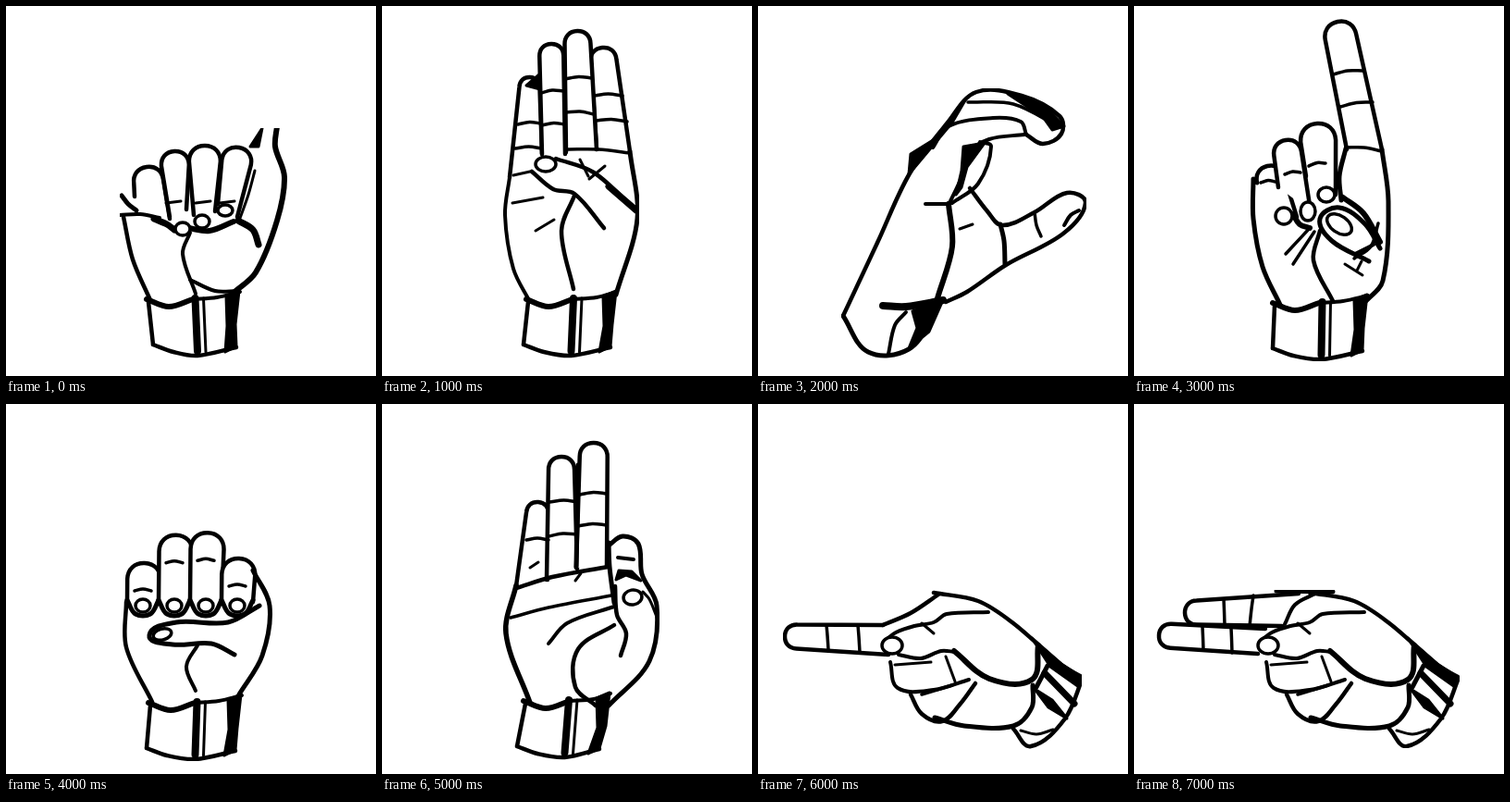
These frames come from a looping animation (400x400 px, 8 s). An HTML page:

```html
<!DOCTYPE html>
<html lang="en">
<head>
<meta charset="utf-8">
<title>Hand alphabet</title>
<style>
html, body { margin: 0; width: 100%; height: 100%; overflow: hidden; background: #fff; }
svg { display: block; width: 100vw; height: 100vh; }
path, ellipse { fill: none; stroke: #000; stroke-linecap: round; stroke-linejoin: round; }
.skin { fill: #fff; }
.dark { fill: #000; }
</style>
</head>
<body>
<svg id="stage" viewBox="0 0 400 400"></svg>
<script>
const HOLD = 1000;
let ink = '';

const draw = (d, w, kind = '') => { ink += `<path d="${d}" stroke-width="${w}" class="${kind}"/>`; };

// Smooth curve through x, y pairs; handles follow the neighbouring points
function curve(xy) {
  const p = [];
  for (let i = 0; i < xy.length; i += 2) p.push([xy[i], xy[i + 1]]);
  const slope = i => {
    const a = p[Math.max(0, i - 1)], b = p[Math.min(p.length - 1, i + 1)];
    const len = Math.hypot(b[0] - a[0], b[1] - a[1]) || 1;
    return [(b[0] - a[0]) / len, (b[1] - a[1]) / len];
  };
  let d = 'M' + p[0];
  for (let i = 1; i < p.length; i++) {
    const a = p[i - 1], b = p[i], s = slope(i - 1), e = slope(i);
    const h = Math.hypot(b[0] - a[0], b[1] - a[1]) / 3;
    d += `C${a[0] + s[0] * h},${a[1] + s[1] * h} ${b[0] - e[0] * h},${b[1] - e[1] * h} ${b}`;
  }
  return d;
}
const line = (w, ...xy) => draw(curve(xy), w);
const dark = (...xy) => draw('M' + xy + 'Z', 3, 'dark');
const crease = (x1, y1, x2, y2) => line(3.5, x1, y1, (x1 + x2) / 2, (y1 + y2) / 2 - 2, x2, y2);

// Finger from one foot over a round tip of radius r to the other foot
function finger(x1, y1, tx, ty, x2, y2, r) {
  const dx = tx - (x1 + x2) / 2, dy = ty - (y1 + y2) / 2, len = Math.hypot(dx, dy);
  const ux = dx / len, uy = dy / len;
  const at = (along, side) => [tx + (ux * along - uy * side) * r, ty + (uy * along + ux * side) * r];
  draw(`M${x1},${y1}L${at(-1, -1)}C${at(-.4, -1)} ${at(0, -.6)} ${at(0, 0)}` +
    `C${at(0, .6)} ${at(-.4, 1)} ${at(-1, 1)}L${x2},${y2}`, 4.5, 'skin');
}

function nail(x, y, rx, ry, turn = 0) {
  ink += `<ellipse cx="${x}" cy="${y}" rx="${rx}" ry="${ry}" transform="rotate(${turn} ${x} ${y})" stroke-width="3.5" class="skin"/>`;
}

// Upright wrist: left edge a to b, right edge c to d, top at y
function wrist(a, b, y, c, d) {
  const m = (a + c) / 2 + 2, n = m + (b - a) / 2;
  line(6, a - 2, y - 3, a + 22, y + 5, a + 48, y - 3);
  line(4, a + 48, y - 3, a + 74, y - 5, c + 2, y - 11);
  line(4.5, a, y, b, y + 46);
  line(4.5, b, y + 46, b + 22, y + 54, n, y + 58, d, y + 49);
  line(8, m, y - 4, n, y + 53);
  line(3, m + 9, y - 4, n + 9, y + 54);
  dark(c - 13, y - 6, c + 1, y - 12, c - 3, y + 24, d, y + 48, d - 12, y + 54, c - 12, y + 26);
}

function fist() {
  finger(139, 206, 152, 174, 177, 230, 16);
  finger(177, 228, 182, 157, 195, 220, 15);
  finger(229, 214, 252, 153, 250, 228, 16);
  finger(203, 226, 215, 151, 226, 222, 17);
  for (const x of [181, 213, 239]) line(3, x - 8, 213, x + 8, 211);
  line(6, 293, 130, 291, 152, 301, 185, 293, 232, 270, 288, 246, 310);
  dark(277, 132, 273, 152, 264, 152);
  line(3, 269, 178, 262, 204, 252, 232);
  line(7, 251, 232, 267, 242, 273, 258);
  line(7, 160, 230, 174, 236, 182, 242);
  line(6, 197, 240, 220, 243, 246, 233);
  nail(191, 241, 8, 7);
  nail(212, 233, 8, 7);
  nail(237, 221, 8, 6);
  line(5, 125, 205, 132, 214, 141, 221);
  line(4, 123, 226, 145, 225, 166, 229);
  line(4.5, 127, 228, 137, 274, 156, 318);
  line(4, 199, 245, 191, 268, 205, 311);
  line(4, 199, 296, 226, 308, 250, 308);
  wrist(154, 159, 320, 251, 249);
}

function flat() {
  finger(138, 185, 160, 77, 173, 160, 11);
  dark(170, 74, 156, 86, 171, 90);
  finger(173, 160, 183, 41, 198, 160, 13);
  finger(232, 155, 238, 45, 268, 157, 14);
  finger(199, 158, 211, 27, 232, 155, 14);
  crease(198, 79, 227, 78);
  crease(199, 115, 229, 117);
  crease(172, 94, 196, 92);
  crease(173, 129, 198, 128);
  crease(229, 97, 260, 97);
  crease(231, 124, 265, 125);
  crease(147, 128, 172, 127);
  crease(144, 154, 173, 154);
  crease(200, 155, 268, 159);
  line(3, 142, 183, 160, 179);
  nail(177, 171, 11, 8);
  line(4.5, 188, 165, 229, 180, 275, 222);
  line(7, 245, 195, 275, 221);
  line(4.5, 162, 179, 185, 198, 208, 203, 240, 240);
  line(3, 214, 166, 223, 184);
  line(3, 241, 173, 224, 187);
  line(3, 141, 213, 174, 207);
  line(3, 166, 243, 186, 231);
  line(4.5, 208, 205, 194, 243, 207, 306);
  line(4, 138, 185, 133, 226, 142, 284, 160, 320);
  line(5, 268, 157, 276, 230, 253, 312);
  wrist(158, 153, 320, 252, 247);
}

function cup() {
  line(4.5, 92, 335, 129, 256, 164, 181, 205, 126, 236, 93, 285, 97, 326, 119, 328, 138, 308, 149, 290, 139);
  dark(163, 182, 165, 160, 194, 142, 224, 102, 210, 126);
  line(3.5, 227, 104, 276, 106, 326, 131);
  dark(270, 95, 310, 108, 331, 130, 318, 134, 308, 120);
  line(4, 189, 153, 206, 130, 254, 121, 284, 125, 290, 139);
  line(4, 288, 139, 250, 144, 226, 160, 220, 185, 207, 213);
  line(4, 240, 147, 252, 152, 238, 192, 210, 213);
  dark(222, 152, 245, 148, 226, 174, 220, 196, 214, 204, 220, 178);
  line(4.5, 229, 197, 248, 222, 264, 237, 299, 223, 334, 202, 354, 213, 330, 246, 268, 280, 226, 309, 203, 320);
  line(5, 262, 236, 266, 254, 267, 279);
  line(3.5, 299, 223, 301, 237, 306, 249);
  line(4, 347, 221, 338, 226, 331, 237);
  line(4, 181, 214, 206, 214);
  line(6, 206, 214, 210, 260, 194, 316);
  line(3, 218, 241, 232, 236);
  line(5, 92, 335, 119, 374, 163, 371, 192, 332);
  line(8, 135, 324, 160, 325, 200, 318);
  line(4, 160, 331, 148, 345, 141, 376);
  dark(167, 330, 200, 318, 185, 352, 163, 370, 172, 348);
}

function pointer() {
  finger(230, 155, 220, 17, 268, 155, 17);
  crease(215, 74, 247, 70);
  crease(223, 109, 258, 104);
  crease(229, 153, 268, 157);
  line(5, 268, 155, 275, 211, 269, 297, 249, 321);
  line(5, 229, 154, 222, 184, 224, 210);
  finger(130, 190, 144, 173, 176, 228, 15);
  finger(156, 196, 164, 145, 191, 222, 15);
  finger(186, 184, 198, 127, 218, 204, 19);
  for (const i of [0, 1, 2]) crease(137 + i * 26, 191 - i * 9, 153 + i * 27, 190 - i * 10);
  line(6, 172, 225, 179, 236, 190, 240);
  nail(162, 227, 9, 9);
  nail(188, 222, 8, 10);
  nail(208, 204, 9, 8);
  line(6, 226, 207, 248, 224, 266, 255);
  line(5, 254, 276, 214, 254, 201, 230, 222, 218, 250, 236, 266, 262);
  nail(222, 236, 15, 9, 35);
  line(3.5, 264, 235, 256, 260, 238, 273);
  line(4, 239, 268, 259, 258);
  line(3, 246, 276, 241, 286);
  line(3, 228, 279, 247, 291);
  line(5, 129, 187, 129, 230, 139, 282, 158, 323);
  line(3.5, 190, 240, 164, 268);
  line(3.5, 195, 244, 172, 279);
  line(4.5, 201, 243, 194, 275, 215, 319);
  wrist(152, 150, 324, 251, 247);
}

function curled() {
  for (const i of [0, 1, 2, 3]) {
    const x = 148 + i * 34, y = 172 - Math.sin(i) * 36;
    finger(x - 17, 214, x + 2, y, x + 17, 214, 18);
    crease(x - 9, y + 30, x + 9, y + 30);
    line(5, x - 17, 212, x - 8, 227, x + 8, 227, x + 17, 212);
    nail(x, 218, 8, 7);
  }
  line(5, 267, 180, 285, 218, 277, 272, 252, 314);
  line(5, 274, 218, 240, 236, 184, 236, 155, 250, 180, 260, 222, 259, 247, 271);
  nail(169, 249, 10, 6, -15);
  line(4.5, 130, 214, 130, 263, 158, 322);
  line(4, 207, 261, 195, 284, 205, 310);
  wrist(156, 152, 326, 253, 248);
}

function ring() {
  finger(145, 197, 169, 106, 179, 190, 12);
  finger(178, 190, 194, 57, 211, 178, 14);
  finger(210, 177, 229, 42, 243, 176, 15);
  line(5, 212, 66, 210, 176);
  crease(214, 98, 243, 97);
  crease(212, 132, 243, 131);
  crease(181, 106, 212, 106);
  crease(180, 143, 211, 141);
  crease(156, 147, 180, 147);
  line(4.5, 145, 199, 184, 187, 244, 176);
  line(3, 160, 177, 169, 171);
  line(3, 209, 191, 215, 183);
  line(5, 245, 153, 260, 143, 277, 151, 281, 184, 297, 218, 289, 278, 245, 326);
  line(5, 245, 150, 246, 176, 251, 215);
  line(4, 255, 166, 272, 168);
  dark(253, 190, 256, 180, 270, 181, 280, 191, 264, 185);
  nail(271, 209, 10, 8, -10);
  line(4.5, 252, 197, 254, 228, 264, 248, 258, 272);
  line(3, 282, 203, 289, 211, 297, 230);
  line(3.5, 139, 231, 180, 220, 248, 207);
  line(4, 180, 259, 200, 237, 251, 219);
  line(4.5, 251, 239, 212, 265, 209, 306, 231, 326);
  line(5.5, 145, 196, 134, 248, 160, 323);
  wrist(155, 146, 324, 245, 235);
}

// Palm, folded fingers and wrist of a hand lying on its side
function side() {
  line(4.5, 190, 204, 238, 213, 276, 237, 328, 282, 350, 295);
  line(4, 152, 271, 176, 275, 198, 267, 213, 268);
  line(4, 138, 255, 149, 247, 169, 240, 190, 236, 204, 227, 249, 225);
  line(3, 177, 237, 190, 248);
  nail(145, 261, 11, 9);
  line(6, 212, 267, 250, 297, 296, 298, 303, 261);
  line(4, 143, 279, 151, 307, 190, 309, 228, 298);
  line(3, 148, 282, 187, 279);
  line(3, 203, 273, 213, 300);
  line(4.5, 165, 314, 177, 335, 199, 343, 218, 325, 235, 302);
  line(3.5, 177, 314, 210, 304);
  line(5, 191, 339, 223, 348, 276, 348, 296, 328, 297, 304);
  line(4.5, 276, 351, 295, 370, 332, 340, 351, 296);
  dark(296, 253, 328, 281, 351, 296, 347, 306, 316, 284);
  line(5, 313, 283, 301, 306);
  line(7, 310, 291, 342, 324);
  dark(299, 308, 318, 320, 334, 340, 314, 328);
  line(3, 284, 353, 301, 357, 319, 352);
}

function oneAside() {
  finger(141, 271, 29, 251, 135, 239, 13);
  crease(74, 239, 76, 265);
  crease(108, 239, 110, 268);
  line(4.5, 135, 239, 165, 226, 195, 206);
  side();
}

function twoAside() {
  finger(160, 240, 55, 226, 178, 205, 13);
  line(5, 154, 202, 215, 203);
  crease(97, 211, 98, 239);
  crease(129, 207, 125, 240);
  line(4, 163, 238, 174, 217, 196, 205);
  finger(134, 270, 27, 250, 142, 243, 13);
  crease(74, 241, 75, 266);
  crease(105, 242, 106, 269);
  side();
}

// Each picture ends hard at its own edges: left, top, right, bottom
function add(pose, l, t, r, b) {
  ink = '';
  pose();
  return `<clipPath id="${pose.name}"><path d="M${l},${t}H${r}V${b}H${l}Z"/></clipPath>
    <g class="hand" clip-path="url(#${pose.name})"><g filter="url(#soft)">${ink}</g></g>`;
}

const stage = document.getElementById('stage');
stage.innerHTML = `<filter id="soft" filterUnits="userSpaceOnUse" x="0" y="0" width="400" height="400">
  <feGaussianBlur stdDeviation=".7"/></filter>` +
  add(fist, 123, 132, 304, 381) +
  add(flat, 131, 24, 278, 382) +
  add(cup, 90, 89, 355, 381) +
  add(pointer, 125, 11, 280, 384) +
  add(curled, 124, 120, 288, 386) +
  add(ring, 130, 39, 300, 385) +
  add(oneAside, 27, 200, 350, 373) +
  add(twoAside, 24, 201, 352, 372);
const poses = [...stage.querySelectorAll('.hand')];

function show(time) {
  const now = Math.floor(time / HOLD) % poses.length;
  poses.forEach((p, i) => p.setAttribute('display', i === now ? 'inline' : 'none'));
}

const start = performance.now();
function tick() {
  show(performance.now() - start);
  requestAnimationFrame(tick);
}
tick();
</script>
</body>
</html>
```
